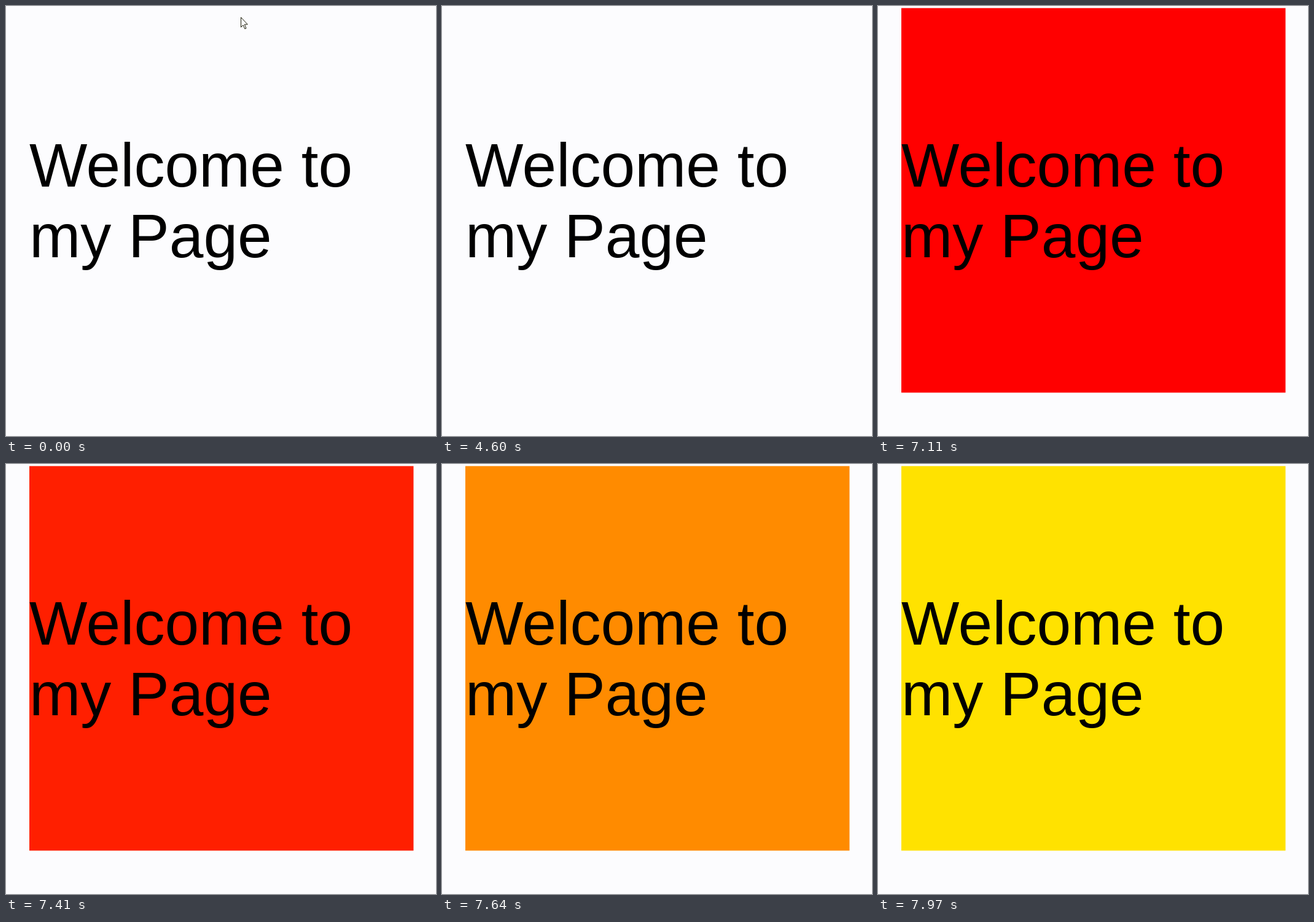
Animation, 700 px wide and 700 px high, one loop 8 s. Source, as an HTML page:

```html
<!DOCTYPE html>
<html lang="en">
<head>
<meta charset="utf-8">
<title>Welcome</title>
<style>
  html, body { margin: 0; width: 100%; height: 100%; overflow: hidden; background: #fcfcfe; }
  svg { display: block; width: 100%; height: 100%; }
  text { font: 100px "Liberation Sans", Arial, sans-serif; }
</style>
</head>
<body>
<svg viewBox="0 0 700 700">
  <rect id="panel" x="38" y="3.4" width="625.4" height="626"/>
  <text x="38" y="294">Welcome to</text>
  <text x="38" y="409">my Page</text>
  <path id="cursor" d="M.5 .5V16.5L4 13L6.8 19.2L9 18.2L6.3 12H11.3Z"
        fill="#fcfcfe" stroke="#1c1c08" stroke-width="1"/>
</svg>
<script>
const LOOP = 8000;
const panel = document.getElementById('panel');
const cursor = document.getElementById('cursor');

const clamp = v => Math.min(1, Math.max(0, v));
const smooth = p => p * p * (3 - 2 * p);
const lerp = (a, b, p) => a + (b - a) * p;
const show = (el, on) => el.setAttribute('visibility', on ? 'visible' : 'hidden');

// CSS "ease": cubic-bezier(.25, .1, .25, 1)
function ease(x) {
  const bez = (a, b, s) => 3 * s * (1 - s) ** 2 * a + 3 * s * s * (1 - s) * b + s ** 3;
  let lo = 0, hi = 1;
  for (let i = 0; i < 24; i++) {
    const mid = (lo + hi) / 2;
    if (bez(.25, .25, mid) < x) lo = mid; else hi = mid;
  }
  return bez(.1, 1, lo);
}

function draw(t) {
  const move = smooth(clamp((t - 30) / 870));
  show(cursor, t < 900);
  cursor.setAttribute('transform', `translate(${lerp(382, 701, move)} ${lerp(18, 30, move)})`);

  const green = Math.round(255 * ease(clamp((t - 7275) / 1160)));
  show(panel, t >= 7110);
  panel.setAttribute('fill', `rgb(255,${green},0)`);
}

const start = performance.now();
function tick() {
  draw((performance.now() - start) % LOOP);
  requestAnimationFrame(tick);
}
draw(0);
requestAnimationFrame(tick);
</script>
</body>
</html>
```
